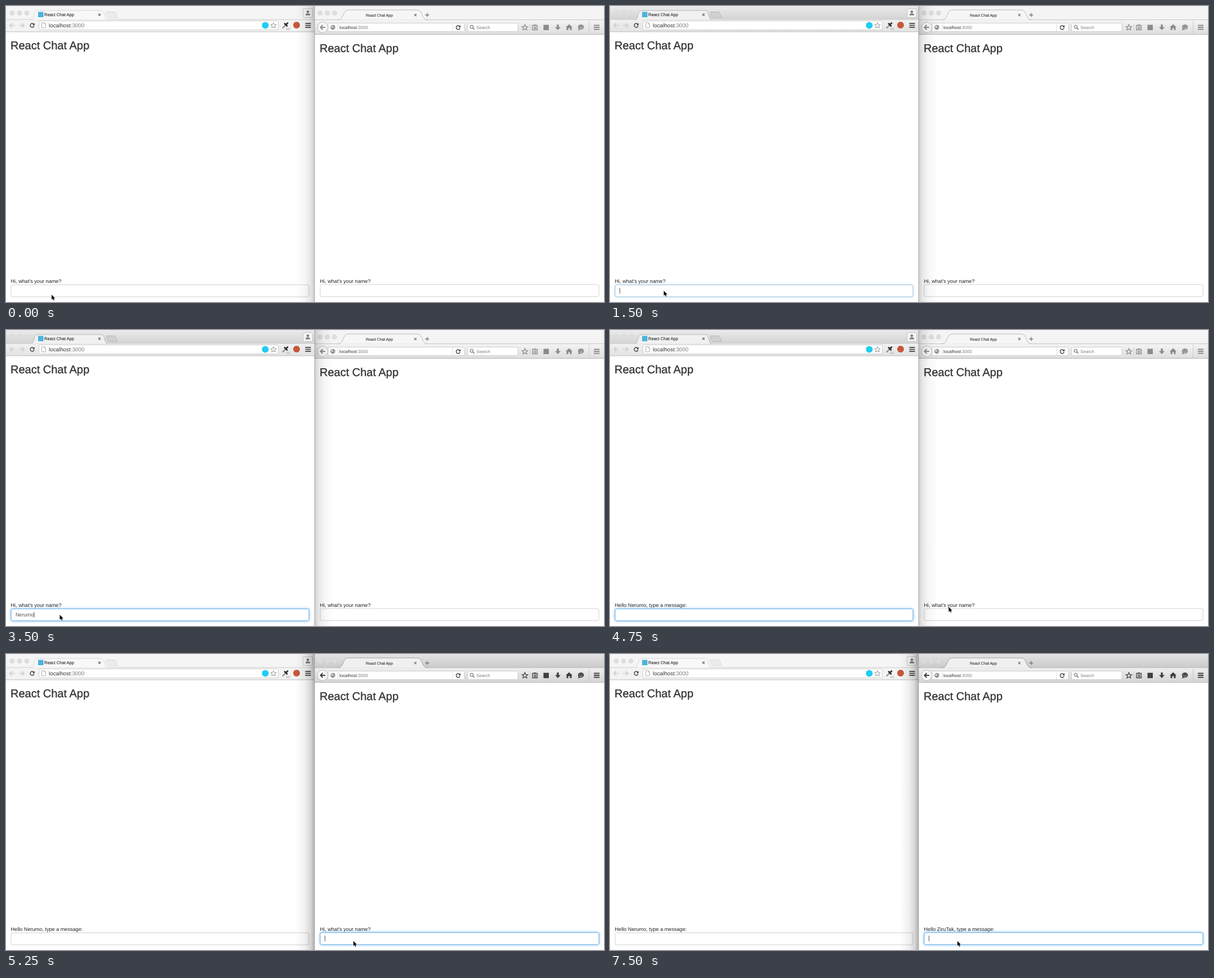
An HTML page for the animation above (8 s loop, 1062 by 527 pixels).

```html
<!DOCTYPE html>
<html lang="en">
<head>
<meta charset="utf-8">
<title>React Chat App</title>
<style>
  html, body { margin: 0; width: 100%; height: 100%; overflow: hidden; background: #fff; }
  svg { display: block; width: 100%; height: 100%; }
  text { font-family: "Liberation Sans", Arial, sans-serif; text-rendering: geometricPrecision; fill: #333; white-space: pre; }
  .win { --ink: #8b8b8b; }
  .win.on { --ink: #404040; }
  .ink { fill: var(--ink); }
  .line { fill: none; stroke: var(--ink); stroke-width: 1.3; }
  .light { fill: #dedede; stroke: #d0d0d0; stroke-width: .5; }
  .on .light { stroke: none; }
  .on .red { fill: #fc5b57; }
  .on .amber { fill: #fdbc40; }
  .on .green { fill: #34c84a; }
  .strip { fill: #f5f5f5; }
  .bar { fill: #f3f3f3; }
  .tab { fill: #f8f8f8; stroke: #cfcfcf; stroke-width: .8; }
  .plus { fill: #ececec; stroke: #d2d2d2; stroke-width: .8; }
  #left.on .strip { fill: url(#stripL); }
  #left.on .bar { fill: url(#barL); }
  #left.on .tab { fill: #f1f1f1; stroke: #aaa; }
  #left.on .plus { fill: #d0d0d0; stroke: #b2b2b2; }
  #right .strip { fill: #f4f4f4; }
  #right .bar { fill: url(#barIdle); }
  #right .tab { fill: #f6f6f6; stroke: #aaa; }
  #right.on .strip { fill: url(#stripR); }
  #right.on .bar { fill: url(#barR); }
  #right.on .tab { fill: #f0f0f0; stroke: #929292; }
  .field { fill: #fff; stroke: #c6c6c6; stroke-width: .8; }
  .title { font-size: 20px; stroke: #333; stroke-width: .35px; }
  .label { font-size: 9.13px; fill: #222; }
  .value { font-size: 9.2px; fill: #555; }
  .dim { fill: #7c7c7c; }
  .glow { fill: #fff; stroke: #66afe9; filter: drop-shadow(0 0 2.4px rgba(102, 175, 233, .75)); }
  .caret { fill: #444; }
</style>
</head>
<body>
<svg viewBox="0 0 1062 527" preserveAspectRatio="none">
  <defs>
    <linearGradient id="stripL" x2="0" y2="1"><stop stop-color="#ebebeb"/><stop offset="1" stop-color="#d3d3d3"/></linearGradient>
    <linearGradient id="barL" x2="0" y2="1"><stop stop-color="#f1f1f1"/><stop offset="1" stop-color="#e3e3e3"/></linearGradient>
    <linearGradient id="stripR" x2="0" y2="1"><stop stop-color="#e4e4e4"/><stop offset="1" stop-color="#c9c9c9"/></linearGradient>
    <linearGradient id="barR" x2="0" y2="1"><stop stop-color="#efefef"/><stop offset="1" stop-color="#d5d5d5"/></linearGradient>
    <linearGradient id="barIdle" x2="0" y2="1"><stop stop-color="#f4f4f4"/><stop offset="1" stop-color="#dedede"/></linearGradient>
    <linearGradient id="shade">
      <stop stop-color="#000" stop-opacity="0"/><stop offset=".5" stop-color="#000" stop-opacity=".06"/>
      <stop offset=".8" stop-color="#000" stop-opacity=".16"/><stop offset="1" stop-color="#000" stop-opacity=".32"/>
    </linearGradient>
    <path id="star" d="M0-5.2 1.5-1.7 5.1-1.5 2.4.8 3.3 4.4 0 2.4-3.3 4.4-2.4.8-5.1-1.5-1.5-1.7Z"/>
    <path id="menu" d="M-5-3.5H5M-5 0H5M-5 3.5H5"/>
    <path id="cross" d="M-2-2 2 2M2-2-2 2"/>
    <g id="lights"><circle class="light red" r="4"/><circle class="light amber" cx="13" r="4"/><circle class="light green" cx="26" r="4"/></g>
    <g id="reload"><path d="M3.1-1.7A3.5 3.5 0 1 0 3.4 1" fill="none" stroke="#444" stroke-width="1.4"/><path d="M4.3-4.2V-.2H.4Z" fill="#444"/></g>
  </defs>

  <g id="left" class="win">
    <rect width="548" height="527" fill="#fff"/>
    <rect class="strip" width="548" height="24"/>
    <rect class="bar" y="24" width="548" height="22"/>
    <path d="M0 24H548" stroke="#c4c4c4" stroke-width=".8"/>
    <path d="M0 45.9H548" stroke="#bcbcbc"/>
    <path class="tab" d="M45 24.3C50 24 49 8 56 8H169C176 8 175 24 180 24.3"/>
    <path class="plus" d="M178 10.5H192Q194 10.5 195 13L198 20.5H183.500Q181.500 20.500 180.500 18Z"/>
    <use href="#lights" x="11" y="12.500"/>
    <rect x="57" y="10.500" width="9.500" height="9.500" fill="#4db3dc"/>
    <text x="68" y="18.200" font-size="7.550" stroke="#333" stroke-width=".15">React Chat App</text>
    <use href="#cross" x="166" y="15.500" stroke="#666" stroke-width="1.100"/>
    <rect x="527.500" y="4.500" width="17" height="16" rx="2" fill="#f3f3f3" stroke="#bcbcbc" stroke-width=".8"/>
    <circle cx="536" cy="10.200" r="2.200" fill="#777"/>
    <path d="M532 16.500V15.500Q532 13.300 536 13.300T540 15.500V16.500Z" fill="#777"/>
    <g fill="none" stroke="#cdcdcd" stroke-width="1.700">
      <path d="M16 34.500H7M11 30.500 7 34.500 11 38.500"/>
      <path d="M23 34.500H32M28 30.500 32 34.500 28 38.500"/>
    </g>
    <use href="#reload" x="46.500" y="34.500"/>
    <rect class="field" x="58.500" y="26.500" width="425" height="16" rx="1.500"/>
    <path d="M63.500 29.500H68L70.500 32V39H63.500ZM68 29.500V32H70.500" fill="#fafafa" stroke="#999" stroke-width=".7"/>
    <text x="76" y="38" font-size="9.800">localhost<tspan class="dim">:3000</tspan></text>
    <circle cx="460.500" cy="34.500" r="6" fill="#21cdf0"/>
    <use href="#star" x="475" y="34.800" fill="#fff" stroke="#888" stroke-width=".9"/>
    <path d="M491 39.500 497 33.500" stroke="#888" stroke-width="2.200"/>
    <path d="M495 31.500 499 35.500M497.500 33 500 30.500" stroke="#333" stroke-width="2.800" stroke-linecap="round"/>
    <rect x="498" y="39.500" width="6" height="3" fill="#ddd" stroke="#aaa" stroke-width=".5"/>
    <circle cx="516" cy="34" r="6" fill="#c8563c"/>
    <use href="#menu" x="536.500" y="34.500" stroke="#555" stroke-width="1.800"/>
    <text class="title" x="8" y="76.500">React Chat App</text>
    <text class="label" x="8.500" y="493"></text>
    <rect class="field" x="9" y="496.500" width="529" height="21.300" rx="2.600"/>
    <rect class="glow" x="9" y="496.500" width="529" height="21.300" rx="2.600"/>
    <text class="value" x="16.900" y="510.300"></text>
    <rect class="caret" y="502" width=".9" height="10"/>
  </g>

  <g id="right" class="win">
    <rect x="548" width="514" height="527" fill="#fff"/>
    <rect class="strip" x="548" width="514" height="25"/>
    <rect class="bar" x="548" y="24.500" width="514" height="26"/>
    <path d="M548 24.500H1062" stroke="#b9b9b9" stroke-width=".8"/>
    <path d="M548 50.500H1062" stroke="#b4b4b4"/>
    <path class="tab" d="M589 24.700C601 24.500 597 7 608 7H730C741 7 737 24.500 749 24.700"/>
    <use href="#lights" x="557.500" y="12.500"/>
    <text x="639" y="18.700" font-size="6.850" stroke="#333" stroke-width=".12">React Chat App</text>
    <use href="#cross" x="727" y="16" stroke="#777" stroke-width="1.100"/>
    <path d="M744.500 16H751.500M748 12.500V19.500" stroke="#777" stroke-width="1.300"/>
    <path class="field" d="M572 30.500H812.500Q814 30.500 814 32V44Q814 45.500 812.500 45.500H572Z"/>
    <circle cx="562.300" cy="38" r="9.300" fill="#f7f7f7" stroke="#b0b0b0" stroke-width=".8"/>
    <path class="line" style="stroke-width:2" d="M567 38H558.500M562.500 34 558.500 38 562.500 42"/>
    <circle cx="580.500" cy="38" r="4.300" fill="#8d8d8d"/>
    <path d="M577.500 36 580 35 581 37.500 578.500 39.500ZM582 38 584 37.500 582.500 41Z" fill="#e4e4e4"/>
    <path d="M589.500 32V44M793 31V45" stroke="#d2d2d2" stroke-width=".8"/>
    <text x="592" y="41" font-size="7.900">localhost<tspan class="dim">:3000</tspan></text>
    <use href="#reload" x="803" y="38.300"/>
    <rect class="field" x="820" y="30.500" width="89" height="15" rx="1.500"/>
    <circle cx="827" cy="37" r="2.700" fill="none" stroke="#777" stroke-width="1.100"/>
    <path d="M829 39 832 42" stroke="#777" stroke-width="1.500"/>
    <text class="dim" x="835.500" y="41" font-size="7.700">Search</text>
    <use href="#star" class="line" x="921.500" y="38.300"/>
    <path d="M930.500 32V44M1035.500 26V50" stroke="#c2c2c2" stroke-width=".7"/>
    <path class="line" d="M935 34.500H943.500V42.500H935ZM937.500 33.700H941M937 37.500H942M937 40H942"/>
    <rect class="ink" x="954.500" y="33.500" width="9.500" height="9.500"/>
    <path class="ink" d="M978.300 33H981.700V37.500H985L980 43 975 37.500H978.300Z"/>
    <path class="ink" d="M1000 32.500 1006 38H1004.500V43H1001.500V39.500H998.500V43H995.500V38H994Z"/>
    <ellipse class="ink" cx="1021" cy="37.500" rx="5.200" ry="4.600"/>
    <path class="ink" d="M1017 39.500 1016 43.500 1021 41.500Z"/>
    <path d="M1018 38.300Q1021 41.500 1024 38.300M1019 35.200V36.500M1023 35.200V36.500" fill="none" stroke="#eee" stroke-width=".9"/>
    <use href="#menu" class="line" style="stroke-width:1.800" x="1049" y="38"/>
    <text class="title" x="557" y="81.700">React Chat App</text>
    <text class="label" x="557.500" y="492.700"></text>
    <rect class="field" x="558" y="496" width="495" height="21.300" rx="2.600"/>
    <rect class="glow" x="558" y="496" width="495" height="21.300" rx="2.600"/>
    <text class="value" x="566" y="510"></text>
    <rect class="caret" y="501.500" width=".9" height="10"/>
  </g>

  <rect id="shadeLeft" x="514" width="34" height="527" fill="url(#shade)"/>
  <rect id="shadeRight" x="-582" width="34" height="527" fill="url(#shade)" transform="scale(-1 1)"/>
  <path d="M548 0V527" stroke="#a2a2a2" stroke-width=".9"/>
  <path id="pointer" d="M0 0V8.800L2 7 3.400 10.100 4.900 9.400 3.500 6.400H6.300Z" stroke="#fff" stroke-width=".9" paint-order="stroke"/>
</svg>
<script>
  const LOOP = 8000;
  const ask = "Hi, what's your name?";
  const greet = name => `Hello ${name}, type a message:`;

  // Typed text: each entry is [time, number of letters shown].
  const typed = (name, steps, sent) => [[0, ""], ...steps.map(([t, n]) => [t, name.slice(0, n)]), [sent, ""]];

  const chats = {
    left: {
      label: [[0, ask], [4000, greet("Nerumo")]],
      value: typed("Nerumo", [[2750, 2], [3000, 3], [3250, 5], [3500, 6]], 4000),
      glow: [[0, 0], [1500, .45], [1750, 1], [4000, .45], [4250, 1], [5000, .8], [5250, 0]],
      caret: [[0, 0], [1500, 1], [2000, 0], [2500, 1], [4500, 0]]
    },
    right: {
      label: [[0, ask], [7500, greet("ZiruTak")]],
      value: typed("ZiruTak", [[5750, 1], [6000, 2], [6250, 4], [6750, 5], [7000, 6], [7250, 7]], 7500),
      glow: [[0, 0], [5250, 1]],
      caret: [[0, 0], [5000, 1]]
    }
  };
  const active = [[0, ""], [1500, "left"], [5000, "right"]];
  const pointer = [[0, [81, 514]], [250, [95.5, 507]], [4500, [371, 467]], [4750, [601.5, 493]], [5000, [619.5, 502]], [5250, [617, 511]]];

  const $ = selector => document.querySelector(selector);
  const at = (track, t) => track.findLast(([start]) => start <= t)[1];

  function drawChat(id, t, focused) {
    const chat = chats[id];
    const part = name => $(`#${id} .${name}`);
    const value = part("value");
    $(`#${id}`).classList.toggle("on", focused);
    part("label").textContent = at(chat.label, t);
    value.textContent = at(chat.value, t);
    part("glow").style.opacity = at(chat.glow, t);
    part("caret").style.opacity = at(chat.caret, t);
    part("caret").setAttribute("x", +value.getAttribute("x") + value.getComputedTextLength());
  }

  function draw(t) {
    const front = at(active, t);
    drawChat("left", t, front === "left");
    drawChat("right", t, front === "right");
    $("#shadeLeft").style.opacity = front === "left" ? 0 : front ? 1 : .65;
    $("#shadeRight").style.opacity = front === "left" ? .6 : 0;
    $("#pointer").setAttribute("transform", `translate(${at(pointer, t)})`);
  }

  const start = performance.now();
  function tick() {
    draw((performance.now() - start) % LOOP);
    requestAnimationFrame(tick);
  }
  tick();
</script>
</body>
</html>
```
